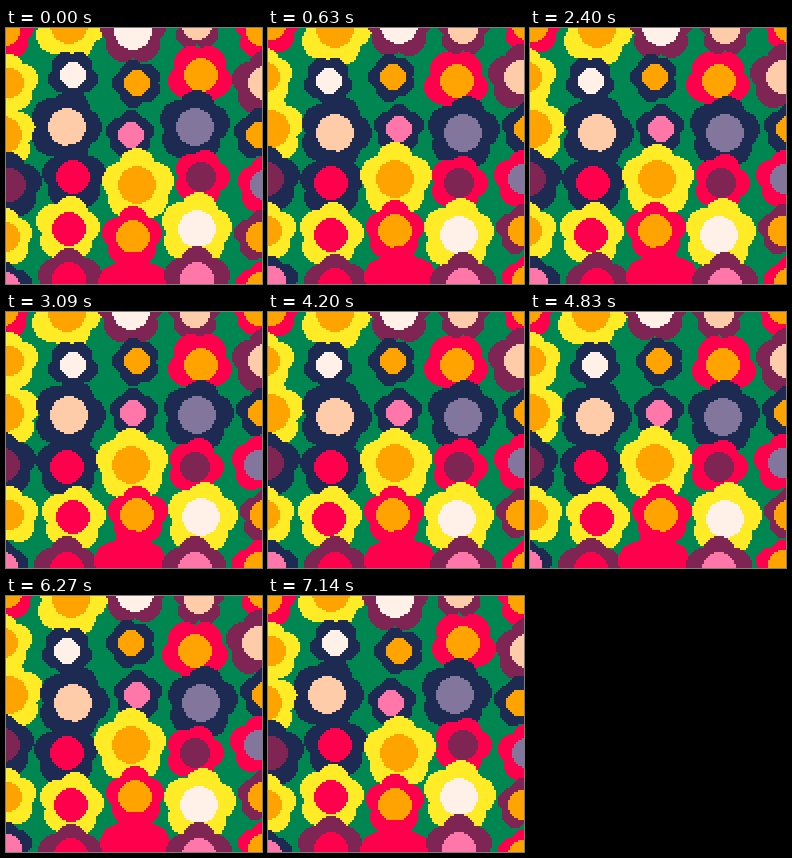
Recreate the animation shown at these times as an HTML page with a canvas. Size 256 by 256 pixels, loop 7.17 s.

```html
<!DOCTYPE html>
<html lang="en">
<head>
<meta charset="utf-8">
<title>Swaying flowers</title>
<style>
html, body { margin: 0; width: 100%; height: 100%; overflow: hidden; background: #008751; }
canvas { display: block; width: 100vw; height: 100vh; image-rendering: pixelated; }
</style>
</head>
<body>
<canvas width="256" height="256"></canvas>
<script>
const ctx = document.querySelector('canvas').getContext('2d');
const STEP = 30, STEPS = 239, TAU = Math.PI * 2, PIXEL = 2;
const GAP_X = 32, GAP_Y = 25.595;

const COLORS = {
  g: '#008751', n: '#1d2b53', p: '#7e2553', r: '#ff004d', o: '#ffa300',
  y: '#ffec27', w: '#fff1e8', s: '#ffccaa', k: '#ff77a8', i: '#83769c'
};

// Each flower: petal colour, centre colour, size, optional tilt in degrees
const ROWS = [
  'ro7.6 yo9.5/18 pw9.2 ps7.2 ro7.2',
  'yo7.9 nw6.6/36 no6.2/-18 ro8.5/36 ps8.6',
  'yo9.2 ns9.4/18 nk6.4 ni9.4/10 no6.8',
  'np8.4 nr8.4 yo9.6 rp7.5/18 ri7.7',
  'yo7.9 yr8.6/9 ro8.1 yw9.5/9 po7.2',
  'nk7.2 pr8.5 rr9.4 pk8.9 ro7.2'
].map(row => row.split(' ').map(text => {
  const [size, tilt = 0] = text.slice(2).split('/').map(Number);
  return { petal: text[0], core: text[1], size, tilt: tilt / 360 };
}));

// Midpoint circle on the coarse pixel grid
function disc(cx, cy, radius, color) {
  const x = Math.floor(cx - 0.0025), y = Math.floor(cy - 0.0025), r = Math.floor(radius);
  ctx.fillStyle = COLORS[color];
  for (let dy = -r; dy <= r; dy++) {
    let half = r;
    while (half > 0 && half * half + dy * dy - Math.max(half, Math.abs(dy)) >= r * r) half--;
    ctx.fillRect((x - half) * PIXEL, (y + dy) * PIXEL, (half * 2 + 1) * PIXEL, PIXEL);
  }
}

function flower(x, y, { petal, core, size, tilt }) {
  for (let i = 0; i < 5; i++) {
    const a = TAU * (i / 5 - 0.25 + tilt);
    disc(x + size * 0.93 * Math.cos(a), y + size * 0.93 * Math.sin(a), size * 0.97, petal);
  }
  disc(x, y, size, core);
}

function draw(now) {
  const turn = (Math.floor(now / STEP) % STEPS - 1) / 60;
  ctx.fillStyle = COLORS.g;
  ctx.fillRect(0, 0, 256, 256);
  ROWS.forEach((row, j) => row.forEach((spec, i) => {
    const x = i * GAP_X, y = j * GAP_Y;
    flower(
      x + 2 * Math.sin(TAU * (turn + y / 64)),
      y + 2 * Math.cos(TAU * (turn + x / 64)),
      spec
    );
  }));
}

const start = performance.now();
function tick() {
  draw(performance.now() - start);
  requestAnimationFrame(tick);
}
tick();
</script>
</body>
</html>
```
